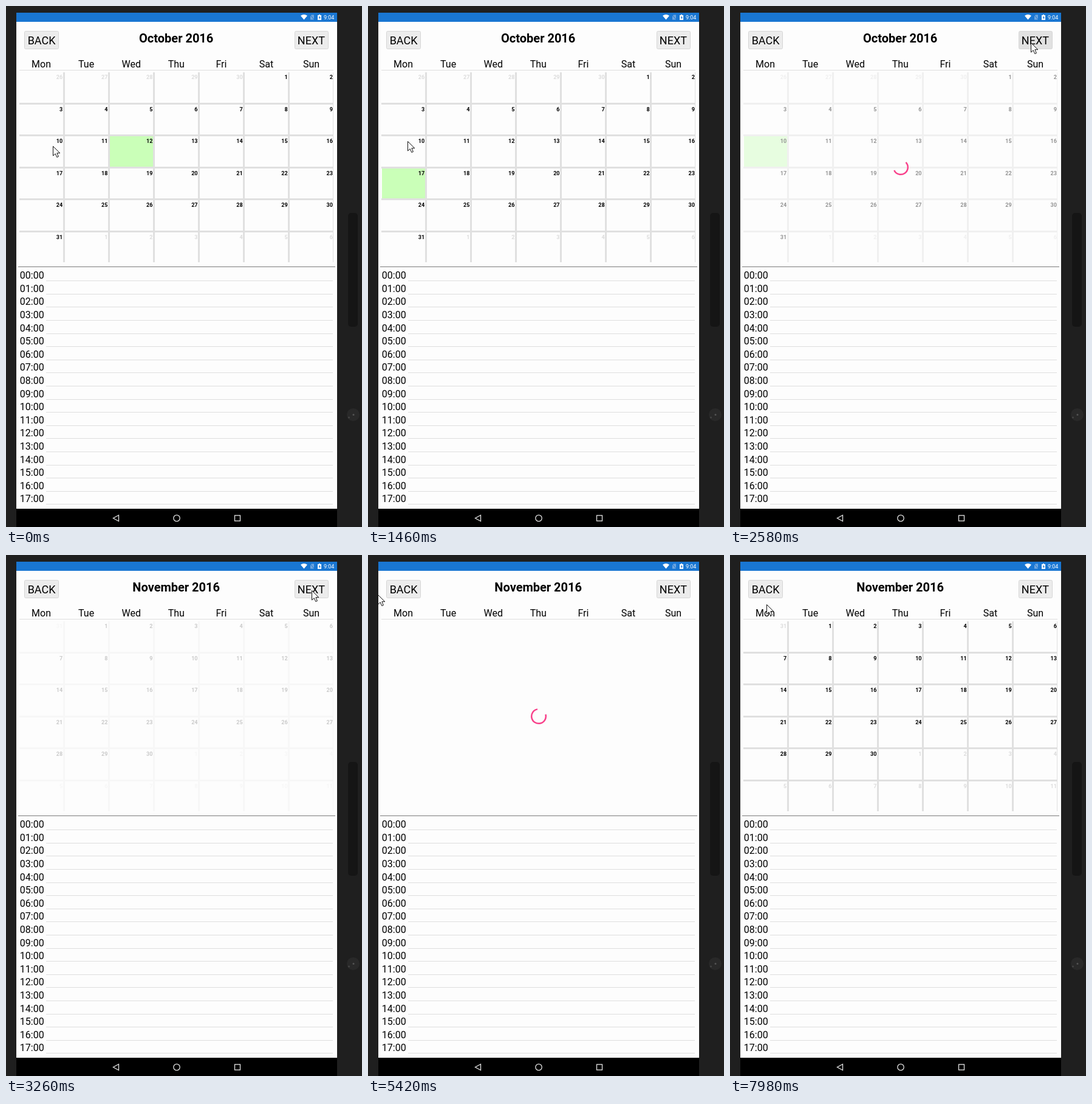
These frames come from a looping animation (586x856 px, 8 s). An HTML page:

```html
<!DOCTYPE html>
<html lang="en">
<head>
<meta charset="utf-8">
<title>Calendar</title>
<style>
  html, body { margin: 0; width: 100%; height: 100%; overflow: hidden; background: #1f1f1f; }
  svg { display: block; width: 586px; height: 856px; font-family: Roboto, "Noto Sans", sans-serif; }
  .title { font-size: 20px; font-weight: 700; text-anchor: middle; }
  .label { font-size: 16px; }
  .mid { text-anchor: middle; }
  .btn text { font-size: 18px; text-anchor: middle; }
  .btn rect { fill: #ececec; stroke: #d6d6d6; }
  .btn.down rect { fill: #e1e1e1; }
  .day { font-size: 9px; font-weight: 700; text-anchor: end; }
  .day.off { fill: #dcdcdc; }
  .nav { fill: none; stroke: #e4e4e4; stroke-width: 1.3; }
</style>
</head>
<body>
<svg viewBox="0 0 586 856">
  <rect width="586" height="856" fill="#1f1f1f"/>
  <rect x="563" y="340" width="16" height="187" rx="5" fill="#151515"/>
  <circle cx="571.5" cy="671.5" r="10.5" fill="#292929"/>
  <circle cx="572" cy="671.5" r="1.5" fill="#555"/>
  <circle cx="564.5" cy="676" r="1.5" fill="#444"/>

  <rect x="17" y="11" width="528" height="815" fill="#fdfdfd"/>
  <rect x="17" y="11" width="528" height="15" fill="#1976d2"/>
  <path d="M485 16Q490.5 12 496 16L490.5 22.5Z" fill="#fff"/>
  <path d="M503 14.5H507V22.5H501V16.5Z" fill="#6fa5de"/>
  <path d="M501 15L507 22" stroke="#1976d2"/>
  <path d="M515 14H517V15H519V23H513V15H515Z" fill="#fff"/>
  <path d="M516.5 16L514.5 19.5H516V22L518 18.5H516.5Z" fill="#1976d2"/>
  <text x="523" y="22" font-size="9" fill="#fff">9:04</text>

  <g class="btn" id="back"><rect x="30.5" y="41.5" width="56" height="29" rx="2"/><text x="58.6" y="63">BACK</text></g>
  <g class="btn" id="next"><rect x="475.5" y="41.5" width="55" height="29" rx="2"/><text x="502.4" y="63">NEXT</text></g>
  <text class="title" id="title" x="280.2" y="60"></text>
  <g id="week"></g>
  <rect x="22" y="105" width="517" height="1" fill="#dedede"/>

  <g id="grid">
    <rect id="sel" width="72" height="51" fill="#caffb8"/>
    <g id="bars" fill="#e0e0e0"></g>
    <g id="days"></g>
  </g>
  <path id="spin" fill="none" stroke="#f8408a" stroke-width="2.5"/>

  <rect x="20" y="428" width="522" height="1" fill="#7a7a7a"/>
  <g id="hours"></g>

  <rect x="17" y="826" width="528" height="30"/>
  <path class="nav" d="M185.5 836.5V846.5L176.5 841.5Z"/>
  <circle class="nav" cx="281" cy="841.5" r="5.2"/>
  <rect class="nav" x="376.5" y="837" width="9" height="9"/>

  <path id="cursor" d="M0 0V15.5L3.7 12.2L6.3 18L8.9 16.9L6.4 11.2H11.3Z" fill="#fff" stroke="#111"/>
</svg>
<script>
const $ = id => document.getElementById(id);
const LOOP = 8000, STEP = 140, COL = 74.1, ROW = 52.5, HOUR = 21.6;
const WAIT = 830, FADE = 460;

function add(parent, tag, attrs, text) {
  const el = document.createElementNS('http://www.w3.org/2000/svg', tag);
  for (const k in attrs) el.setAttribute(k, attrs[k]);
  if (text) el.textContent = text;
  return parent.appendChild(el);
}
const bar = (x, y, width, height) => add($('bars'), 'rect', { x, y, width, height });

['Mon', 'Tue', 'Wed', 'Thu', 'Fri', 'Sat', 'Sun'].forEach((name, i) =>
  add($('week'), 'text', { class: 'label mid', x: 58 + COL * i, y: 101 }, name));

for (let i = 0; i < 6; i++) bar(Math.floor(94 + COL * i), 109, 3, 312);
for (let i = 0; i < 5; i++) bar(22, Math.round(158.6 + ROW * i), 517, 3);
bar(538, 109, 1, 312);

const days = Array.from({ length: 42 }, (_, i) => add($('days'), 'text', {
  x: 93.2 + COL * (i % 7), y: Math.round(120.2 + ROW * Math.floor(i / 7))
}));

for (let i = 0; i < 18; i++) {
  const y = Math.round(451.15 + HOUR * i);
  add($('hours'), 'text', { class: 'label', x: 22.8, y: y - 3 }, String(i).padStart(2, '0') + ':00');
  add($('hours'), 'rect', { x: 66, y, width: 472, height: 1, fill: '#dedede' });
}

// Pointer stops, eased in between
const stops = [
  { t: 0, x: 77, y: 230 }, { t: 600, x: 62, y: 244 }, { t: 950, x: 60, y: 285 },
  { t: 1460, x: 65, y: 222 }, { t: 2150, x: 495, y: 60 }, { t: 2580, x: 495, y: 60 },
  { t: 3570, x: 508, y: 56 }, { t: 4620, x: 508, y: 56 }, { t: 5380, x: 16, y: 65 },
  { t: 5900, x: 45, y: 54 }, { t: 7560, x: 45, y: 54 }, { t: 7900, x: 60, y: 81 }
];
const picks = [{ t: 0, day: 12 }, { t: 460, day: 10 }, { t: 1040, day: 17 }, { t: 1600, day: 10 }];
const clicks = [{ t: 2430, btn: 'next' }, { t: 4740, btn: 'next' }, { t: 6730, btn: 'back' }];

const snap = t => Math.floor(t / STEP) * STEP;

function pointer(t) {
  const i = stops.findIndex(s => s.t > t);
  if (i < 0) return stops[stops.length - 1];
  if (i === 0) return stops[0];
  const a = stops[i - 1], b = stops[i];
  const k = (t - a.t) / (b.t - a.t), e = k * k * (3 - 2 * k);
  return { x: Math.round(a.x + (b.x - a.x) * e), y: Math.round(a.y + (b.y - a.y) * e) };
}

function showMonth(month) {
  const lead = (new Date(Date.UTC(2016, month, 1)).getUTCDay() + 6) % 7;
  days.forEach((el, i) => {
    const d = new Date(Date.UTC(2016, month, 1 - lead + i));
    el.textContent = d.getUTCDate();
    el.setAttribute('class', d.getUTCMonth() === month ? 'day' : 'day off');
  });
  $('title').textContent = ['October', 'November', 'December'][month - 9] + ' 2016';
}

function arc(from, to) {
  const at = deg => {
    const a = deg * Math.PI / 180;
    return `${281 + 11.8 * Math.sin(a)} ${265 - 11.8 * Math.cos(a)}`;
  };
  return `M${at(from)}A11.8 11.8 0 ${to - from > 180 ? 1 : 0} 1 ${at(to)}`;
}

let shown = 0;
function render(t) {
  let month = 9, alpha = 1, spin = '', down = '';
  for (const { t: at, btn } of clicks) {
    if (t < at) break;
    if (t >= at + WAIT) {
      month += btn === 'next' ? 1 : -1;
      alpha = Math.min(1, 0.2 + snap(t - at - WAIT) / FADE);
    } else {
      const u = snap(t - at), p = Math.min(1, u / 300);
      alpha = Math.max(0, 0.72 - u / FADE);
      spin = arc(20 + 55 * p, 85 + 265 * p ** 0.66);
      if (u < 2 * STEP) down = btn;
    }
  }
  if (month !== shown) showMonth(shown = month);
  $('grid').setAttribute('opacity', alpha);
  $('spin').setAttribute('d', spin);
  for (const id of ['back', 'next']) $(id).classList.toggle('down', id === down);

  const cell = picks.filter(p => p.t <= t).pop().day + 4;
  $('sel').setAttribute('x', Math.round(22.6 + COL * (cell % 7)));
  $('sel').setAttribute('y', Math.round(109 + ROW * Math.floor(cell / 7)));
  $('sel').setAttribute('visibility', month === 9 ? 'visible' : 'hidden');

  const { x, y } = pointer(snap(t - 60) + 60);
  $('cursor').setAttribute('transform', `translate(${x + 0.5} ${y + 0.5})`);
}

const start = performance.now();
function loop() {
  render((performance.now() - start) % LOOP);
  requestAnimationFrame(loop);
}
loop();
</script>
</body>
</html>
```
